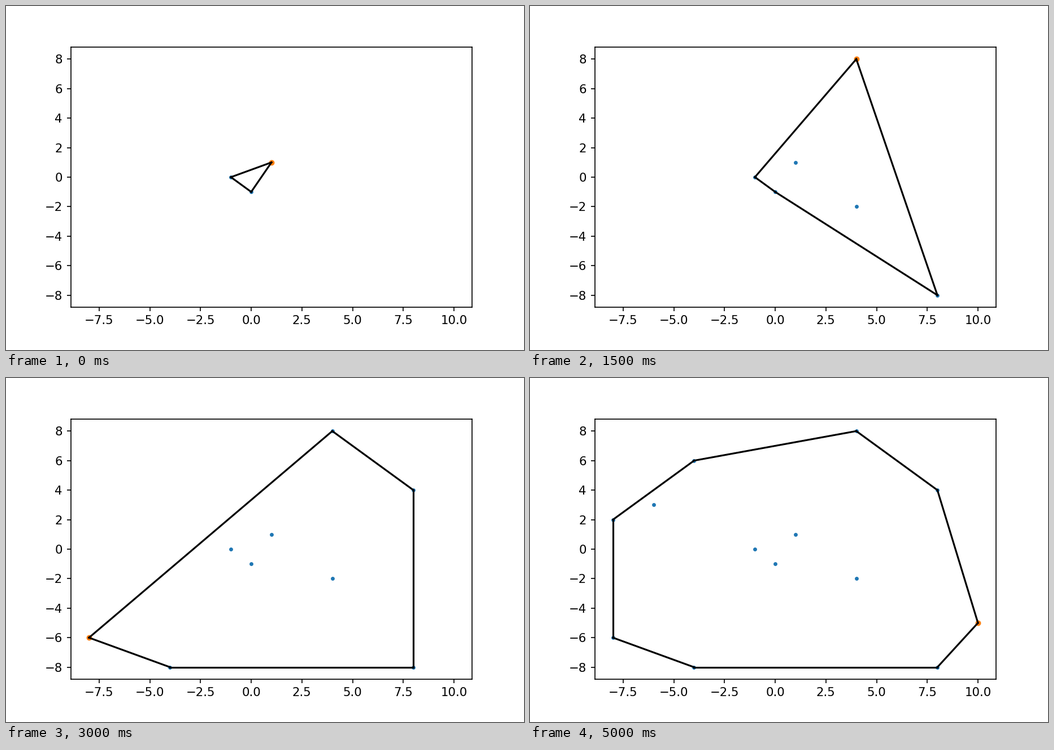
A matplotlib script for the animation above (5500 ms loop, 917x611 px).

```python
import matplotlib.pyplot as plt
from matplotlib.animation import ArtistAnimation

WIDTH, HEIGHT, DPI = 917, 611, 152.8
EPS = 1e-6  # keeps the pixel size from truncating one short
STEP_MS = 500
BLUE, ORANGE = "tab:blue", "tab:orange"

POINTS = [
    (-1, 0), (0, -1), (1, 1), (4, -2), (8, -8), (4, 8), (8, 4),
    (-4, -8), (-8, -6), (-4, 6), (-8, 2), (-6, 3), (10, -5),
]


def cross(o, a, b):
    return (a[0] - o[0]) * (b[1] - o[1]) - (a[1] - o[1]) * (b[0] - o[0])


def half_hull(points):
    chain = []
    for p in points:
        while len(chain) > 1 and cross(chain[-2], chain[-1], p) <= 0:
            chain.pop()
        chain.append(p)
    return chain[:-1]


def convex_hull(points):
    """Corners of the hull, counter-clockwise (monotone chain)."""
    ordered = sorted(points)
    return half_hull(ordered) + half_hull(ordered[::-1])


def draw_step(ax, points):
    """Points so far, the newest one highlighted, and the hull edges."""
    artists = [
        ax.scatter(*zip(*points), s=3, color=BLUE, linewidths=1.5),
        ax.scatter(*points[-1], s=10, color=ORANGE, linewidths=1.5),
    ]
    hull = convex_hull(points)
    for a, b in zip(hull, hull[1:] + hull[:1]):
        artists += ax.plot(*zip(a, b), color="black", linewidth=1.5)
    return artists


plt.rcParams["font.family"] = "DejaVu Sans"
fig = plt.figure(figsize=((WIDTH + EPS) / DPI, (HEIGHT + EPS) / DPI), dpi=DPI)
fig.subplots_adjust(left=0.125, right=0.9, bottom=0.125, top=0.88)
ax = fig.add_subplot()

steps = [draw_step(ax, POINTS[:n]) for n in range(3, len(POINTS) + 1)]
ax.set_xlim(-8.9, 10.9)
ax.set_ylim(-8.8, 8.8)
ax.set_xticks([-7.5 + 2.5 * i for i in range(8)])
ax.set_yticks(range(-8, 9, 2))

anim = ArtistAnimation(fig, steps, interval=STEP_MS, repeat=True, repeat_delay=0)
plt.show()
```
